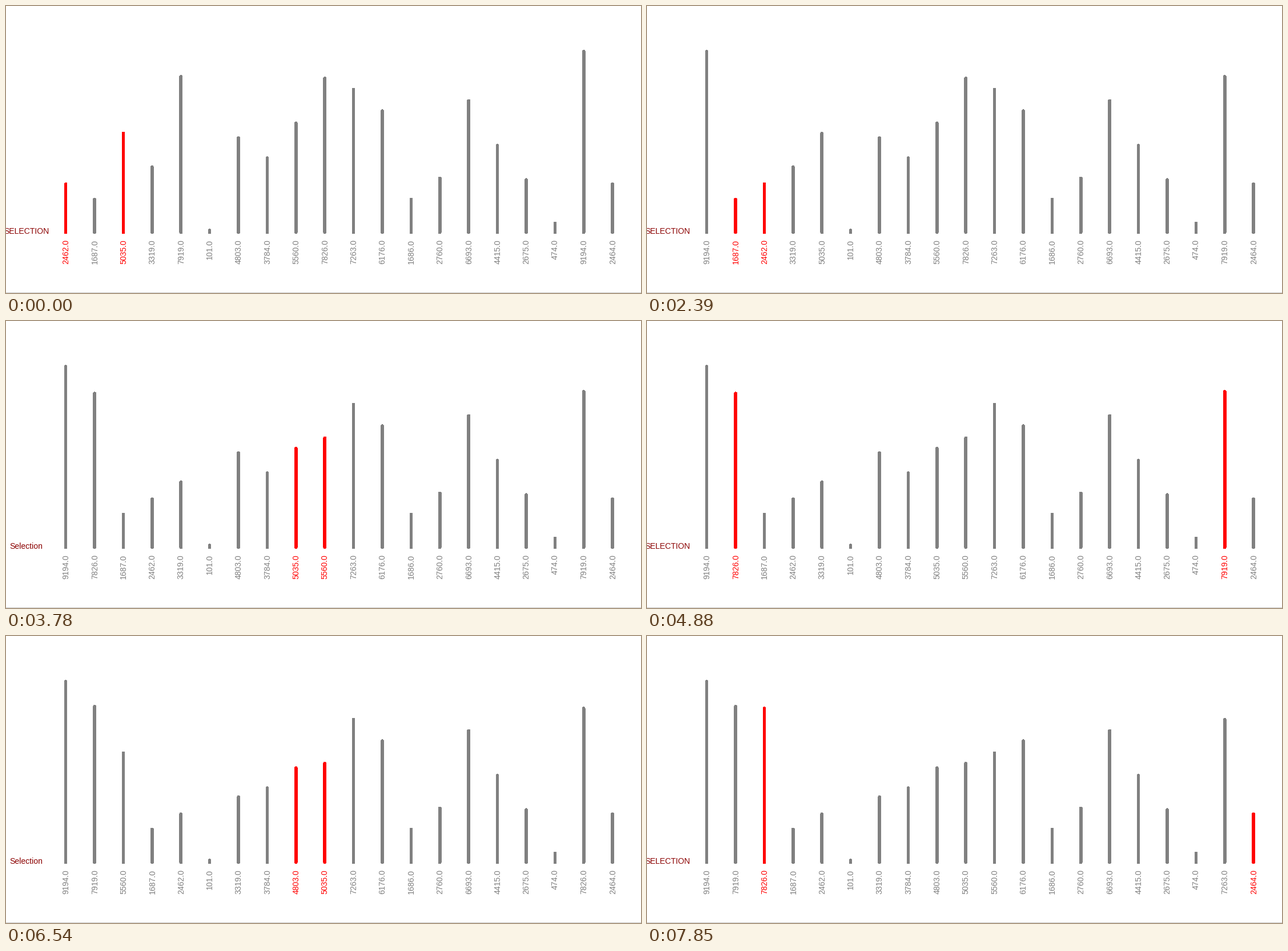
A matplotlib script that plays this animation: 1112 px wide and 504 px high, repeating every 8000 ms.

```python
import itertools

import matplotlib.pyplot as plt
import numpy as np
from matplotlib.animation import FuncAnimation

W, H, DPI = 1112, 504, 64
PT = 72 / DPI                      # points per pixel
LOOP, INTERVAL = 8000, 20
GREY, RED, DARK_RED = "#808080", "#ff0000", "#8b0000"

VALUES = [2462, 1687, 5035, 3319, 7919, 101, 4803, 3784, 5560, 7826,
          7263, 6176, 1686, 2760, 6693, 4415, 2675, 474, 9194, 2464]

# The sort runs at a nearly even pace with one stall, after which it catches up.
KEY_STEPS = [0, 21, 33, 48, 49, 51, 68]
KEY_TIMES = [0, 2390, 3780, 5590, 5910, 5910, 7850]
STEPS = KEY_STEPS[-1] + 1
STARTS = np.interp(range(STEPS), KEY_STEPS, KEY_TIMES)

LEFT, GAP = 104.7, 50.39
BASE_Y, SCALE = 397.6, 0.03457


def sort_steps(values):
    """Yield (values, highlighted pair, caption) for a descending sort."""
    a = list(values)
    n = len(a)
    for i in range(n - 1):
        for j in range(2 if i == 0 else i + 1, n):
            yield a[:], (i, j), "SELECTION"
            if a[j] > a[i]:
                a[i], a[j] = a[j], a[i]
                yield a[:], (j - 1, j), "Selection"


states = list(itertools.islice(sort_steps(VALUES), STEPS))

plt.rcParams["font.family"] = "Liberation Sans"
fig = plt.figure(figsize=(W / DPI, H / DPI), dpi=DPI, facecolor="white")
ax = fig.add_axes([0, 0, 1, 1])
ax.set_xlim(0, W)
ax.set_ylim(H, 0)
ax.axis("off")

ax.plot([0, W], [502.5, 502.5], color="#c8c8c8", lw=PT, antialiased=False)
caption = ax.text(35.5, 400, "", color=DARK_RED, fontsize=14 * PT,
                  ha="center", va="baseline")

bars, labels = [], []
for k in range(len(VALUES)):
    x = LEFT + GAP * k
    # Without antialiasing every touched pixel is filled, hence the thin stroke.
    bar, = ax.plot([x, x], [BASE_Y, BASE_Y], lw=4.6 * PT, snap=False,
                   solid_capstyle="round", antialiased=False)
    bars.append(bar)
    labels.append(ax.text(x + 4.7, 410, "", fontsize=14 * PT, rotation=90,
                          rotation_mode="anchor", ha="right", va="baseline"))


def draw(frame):
    t = (frame + 0.5) * INTERVAL
    step = np.searchsorted(STARTS, t + 1e-6, side="right") - 1
    values, pair, word = states[step]
    caption.set_text(word)
    for k, (value, bar, label) in enumerate(zip(values, bars, labels)):
        color = RED if k in pair else GREY
        bar.set_ydata([BASE_Y, BASE_Y - SCALE * value])
        bar.set_color(color)
        label.set_text(f"{value:.1f}")
        label.set_color(color)
    return [caption, *bars, *labels]


anim = FuncAnimation(fig, draw, frames=LOOP // INTERVAL, interval=INTERVAL,
                     repeat=True, repeat_delay=0, blit=False)
plt.show()
```
